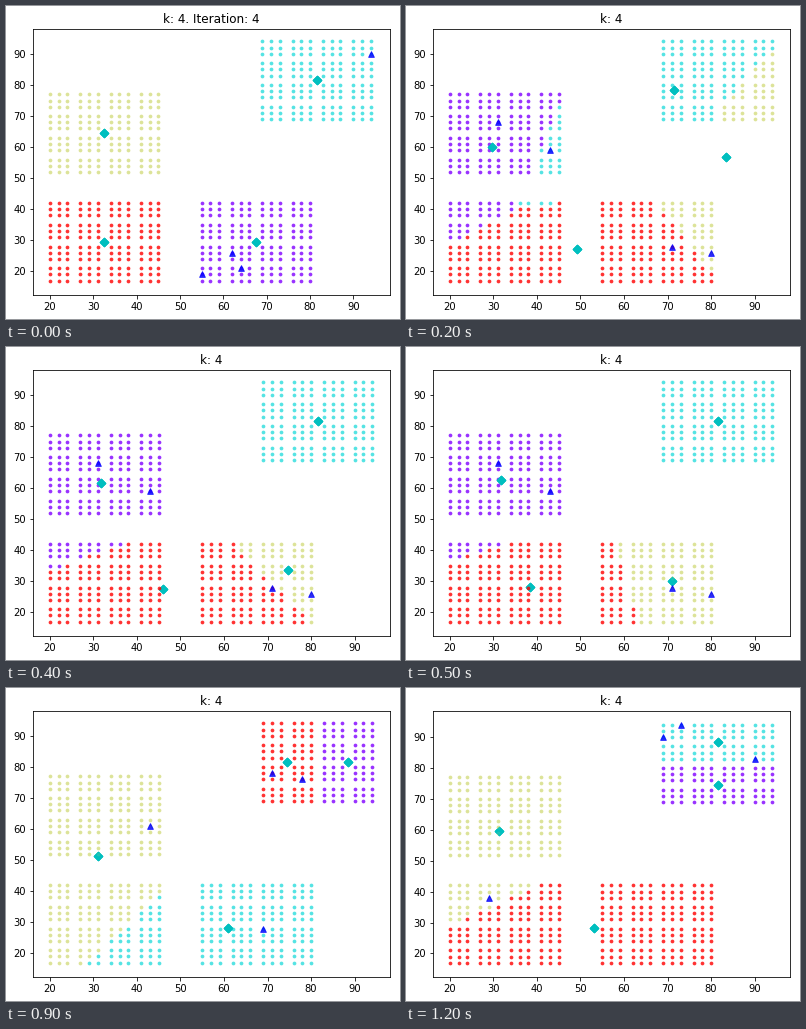
Animation of 394 by 313 pixels, one loop 1400 ms. Source, as a matplotlib script:

```python
import numpy as np
import matplotlib.pyplot as plt
from matplotlib.animation import FuncAnimation

W, H, DPI = 394, 313, 72
LEFT, TOP = 27, 23
AX_W, AX_H = 6.4 * DPI * 0.775, 4.8 * DPI * 0.77  # default axes proportions
K = 4
ALPHA = 0.8
COLORS = plt.cm.rainbow(np.linspace(0, 1, K))  # purple, cyan, yellow, red

# Square blocks of 12 x 12 points with a small gap after every third point
CORNERS = np.array([(55, 17), (69, 69), (20, 52), (20, 17)])
STEPS = 7 * (np.arange(12) // 3) + 2 * (np.arange(12) % 3)
GRID = np.array(np.meshgrid(STEPS, STEPS)).reshape(2, -1).T
POINTS = (CORNERS[:, None] + GRID).reshape(-1, 2)


def kmeans(means):
    """Return every (labels, means) state until the labels settle."""
    states = []
    while True:
        dist = ((POINTS[:, None] - means) ** 2).sum(axis=2)
        labels = dist.argmin(axis=1)
        if states and (labels == states[-1][0]).all():
            return states
        means = np.array([POINTS[labels == k].mean(axis=0) for k in range(K)])
        states.append((labels, means))


# Starting centres of each restart, in colour order
rng = np.random.default_rng(3)
SEEDS = [np.array(s) for s in (
    [(31, 68), (43, 59), (80, 26), (71, 28)],
    [(78, 76), (69, 28), (43, 61), (71, 78)],
    CORNERS + STEPS[rng.integers(1, 11, (K, 2))],
    [(64, 21), (94, 90), (62, 26), (55, 19)],
    [(90, 83), (73, 94), (69, 90), (29, 38)],
)]
RUNS = [kmeans(s) for s in SEEDS]
BEST = 3
FIRST_RUN = 8  # frames spent on stepping through the first restart

fig = plt.figure(figsize=((W + 0.01) / DPI, (H + 0.01) / DPI), dpi=DPI,
                 facecolor="white")
ax = fig.add_axes([LEFT / W, 1 - (TOP + AX_H) / H, AX_W / W, AX_H / H])


def pick(frame):
    """Restart index and iteration index shown at a frame."""
    if frame == 0:
        return BEST, -1
    if frame <= FIRST_RUN:
        return 0, min(frame, len(RUNS[0])) - 1
    return min(frame - FIRST_RUN, len(RUNS) - 1), -1


def limits(data, seeds, length, pad_lo, pad_hi):
    """Axis limits that leave pixel margins, wider for a seed on the edge."""
    lo, hi = data.min(), data.max()
    pad_hi += 1.2 * (seeds.max() == hi)
    unit = (hi - lo) / (length - pad_lo - pad_hi)
    return lo - pad_lo * unit, hi + pad_hi * unit


def draw(frame):
    run, step = pick(frame)
    labels, means = RUNS[run][step]
    seeds = SEEDS[run]
    ax.clear()
    for k, color in enumerate(COLORS):
        # Centres go below each cluster, so only the last cluster covers them
        ax.scatter(*means.T, marker="D", color="c", alpha=ALPHA)
        ax.scatter(*POINTS[labels == k].T, s=14, color=[color], lw=0,
                   alpha=ALPHA)
    ax.scatter(*seeds.T, marker="^", s=32, color="blue", alpha=ALPHA)
    ax.set_xlim(limits(POINTS[:, 0], seeds[:, 0], AX_W, 16.9, 18.1))
    ax.set_ylim(limits(POINTS[:, 1], seeds[:, 1], AX_H, 14.4, 12.5))
    ax.set_xticks(range(20, 91, 10))
    ax.set_yticks(range(20, 91, 10))
    title = f"k: {K}"
    if frame == 0:
        title += f". Iteration: {BEST + 1}"
    ax.set_title(title, fontsize=12)
    return ax.get_children()


anim = FuncAnimation(fig, draw, frames=14, interval=100, repeat=True,
                     repeat_delay=0, blit=False)
plt.show()
```
